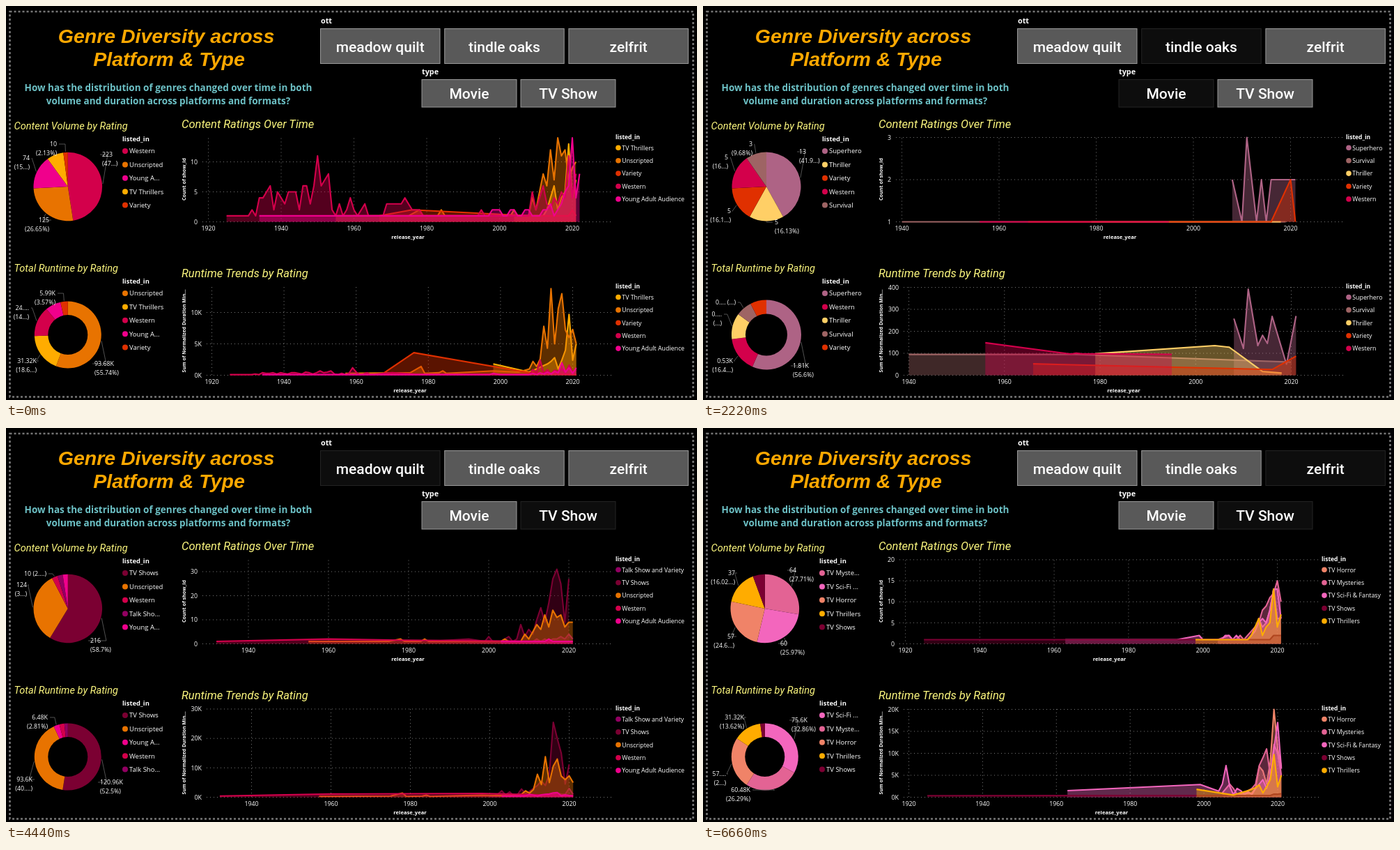
These frames come from a looping animation (992 px wide and 565 px high, 7770 ms). An HTML page:

```html
<!DOCTYPE html>
<html lang="en">
<head>
<meta charset="utf-8">
<title>Genre dashboard</title>
<style>
html, body { margin: 0; width: 100%; height: 100%; overflow: hidden; background: #000; }
svg { display: block; width: 992px; height: 565px; }
text { fill: #fff; font: 8.8px "Open Sans", "Noto Sans", sans-serif; }
.e { text-anchor: end; }
.m { text-anchor: middle; }
.b { font-weight: 700; }
.head { font: italic 700 28.5px "Liberation Sans", Arial, sans-serif; fill: #ffa800; }
.sub { font-size: 13.5px; font-weight: 700; fill: #6cc0c5; }
.cap { font: italic 14.6px Roboto, sans-serif; fill: #fbf67e; }
.big { font-size: 16.5px; }
.btn { font: 500 21px Roboto, sans-serif; }
.key { font-size: 9.5px; }
.grid { stroke: #777; stroke-dasharray: 1 4; }
.lead { stroke: #666; stroke-width: .8; fill: none; }
</style>
</head>
<body>
<svg id="stage" viewBox="0 0 992 565"></svg>
<script>
// key: colour, full name, short name
const GENRES = {
  W: ['#d3004b', 'Western'],
  U: ['#e87300', 'Unscripted'],
  Y: ['#f0008c', 'Young Adult Audience', 'Young A...'],
  H: ['#ffac00', 'TV Thrillers'],
  V: ['#e03000', 'Variety'],
  S: ['#c265a4', 'Suspense'],
  K: ['#920062', 'Talk Show and Variety', 'Talk Sho...'],
  P: ['#ae6385', 'Superhero'],
  T: ['#ffcf66', 'Thriller'],
  B: ['#9e6464', 'Survival'],
  R: ['#7f5500', 'Romantic Movies', 'Romantic...'],
  L: ['#7a0049', 'Thrillers'],
  N: ['#6e0028', 'Stand-Up Comedy', 'Stand-Up...'],
  F: ['#763c00', 'Sci-Fi &amp; Fantasy', 'Sci-Fi &amp; F...'],
  M: ['#741a00', 'Sports Movies', 'Sports M...'],
  X: ['#7b0032', 'TV Shows'],
  A: ['#5c0006', 'Talk Show'],
  G: ['#f4a967', 'Travel'],
  Q: ['#e36394', 'TV Mysteries', 'TV Myste...'],
  J: ['#f366bd', 'TV Sci-Fi &amp; Fantasy', 'TV Sci-Fi ...'],
  O: ['#f08368', 'TV Horror']
};

// Series: "@year" jumps, a value moves one year on, "v*n" repeats.
const unscripted = '@1955 1 @1975 1 @1978 2 1 @1983 1 2 1 @2003 1 2 1 @2008 1 4 2 5 8 6 12 7 14 11 12 7 9 ';
const unscriptedMin = '@1957 .3 @1975 .4 @1978 1.4 .3 @1983 .4 .7 .3 @1998 .7 @2005 .5 @2008 1 2.2 1.4 2.6 7.8 4.3 13.8 5 10.6 13 7.2 6 7.3 5';
const tvThrill = '@1998 1 @2012 1 2 4 6 2 4 5 13 4 7';
const tvThrillMin = '@1998 1.8 @2008 .5 @2013 1.8 2.2 2.8 1 2.4 4 9.7 2.4 5';
const suspense = {
  S: '@1922 3 @1934 4 @1950 5 @1954 3 @1966 4 @1972 3 @1982 4 6 3 4 7 9 8 8 9 13 9 14 12 17 12 11 12 13 12 22 10 16 23 21 24 26 27 17 22 21 32 45 65 53 73 85 140 238',
  K: '@1960 1 @2021 1',
  U: '@2021 1',
  W: '@1925 2 @1932 3 2 5 5 6 7 3 6 5 4 6 6 6 3 7 7 4 7 11 7 8 9 3 @1970 3 @1990 2 @2021 3',
  Y: '@1955 1 @1975 2 @2008 3 4 3 4 3 4 4 6 5 5 6 12 5 4'
};
const drama = {
  R: '@1956 1 @1961 2 @1965 4 @1971 2 @1984 3 @1992 2 @1995 2 2 5 5 4 7 5 6 9 8 15 14 12 16 10 27 20 13 10 23 32 27 48 38 45 37 13',
  F: '@1956 1 @1970 2 @1995 2 @2000 4 3 5 3 4 6 5 4 8 43 12 8 10 7 14 22 25 28 38 15 0',
  M: '@1980 1 @2000 2 3 4 3 4 5 5 6 5 8 7 6 8 10 14 20 28 30 24 22 20 12',
  N: '@1968 1 @2000 2 2 3 2 3 4 4 3 5 4 6 5 7 10 13 20 24 27 33 28 22 10',
  L: '@1984 1 1 1 @1990 1 4 2 1 3 2 2 6 5 3 4 6 11 5 7 6 5 7 9 11 14 9 7 14 28 45 73 73 75 45 33 16'
};

const SCENES = [
  { sel: [-1, -1], pie: { W: 223, U: 125, Y: 74, H: 37, V: 10 },
    pieTags: [[0, 138, 216, '223|(47...)'], [1, 62, 310, '125|(26.65%)'], [2, 34, 221, '74|(15...)'], [4, 73, 201, '10|(2.13%)']],
    ring: { U: 93.68, H: 31.32, W: 24.5, Y: 12.57, V: 5.99 },
    ringTags: [[0, 127, 516, '93.68K|(55.74%)'], [1, 44, 512, '31.32K|(18.6...)'], [2, 33, 436, '24....|(14...)'], [4, 71, 415, '5.99K|(3.57%)']],
    top: { l: 282, r: 872, x: [1920, 290.5, 5.225], y: '0 5 10', h: 43, data: {
      H: tvThrill.replace('@1998 1', '@2004 1'), U: unscripted + 10, V: '@1967 1 @1976 2 @2008 1 @2018 1 1 2 1',
      W: '@1925 1*7 2 1 4 4 5 6 2 5 4 3 5 5 5 2 6 6 3 6 11 6 7 8 2 1 3 1 2 4 2 1 2 3 1 @1968 1 3*5 4 3 2*3 1 @1994 1 2 1 @2007 1 1 5 2 4 6 3 2 4 3 5 4 11 4 8',
      Y: '@1934 1 @1997 1 2*3 1 1 2 2 1 1 2 2 1 1 1 2 2 3 1 2 3 5 6 14 4 8' } },
    low: { l: 288, r: 872, x: [1920, 295.5, 5.18], y: '0K 5K 10K', h: 45, data: {
      H: tvThrillMin, U: unscriptedMin, V: '@1967 .1 @1976 3.6 @2008 .4 @2021 .1',
      W: '@1925 .1 @1931 .1 .2 .1 .4 .3 .3 .4 .2 .4 .3 .2 .4 .4 .3 .2 .5 .4 .2 .4 .7 .4 .5 .7 .2 .1 .3 .1 .3 1.2 .5 .1 .2 .4 .1 @1970 .4 @1976 .2 @2008 .1 .9 .4 2.4 .3 .9 .2 .8 .6 1 .4 1.6 .5 .9',
      Y: '@1934 .1 @1997 .1 .3 .2 .1 @2008 .1 .3 .1 .4 .2 .5 .2 .6 .4 2 .5 1.2 .3 1.2' } } },

  { sel: [0, 0], pie: { S: 1240, W: 207, Y: 58, K: 5, U: 4 },
    pieTags: [[0, 131, 303, '1.24K|(81.9%)'], [1, 50, 208, '0.21K|(13.66%)']],
    ring: { S: 84.25, W: 11.43, Y: 3.9, U: .3, K: .12 },
    ringTags: [[0, 127, 516, '121.08K|(84.25%)'], [1, 53, 420, '16.43K|(11.43%)']],
    top: { l: 288, r: 872, x: [1920, 295.5, 5.18], y: '0 100 200', h: 48.5, data: suspense },
    low: { l: 288, r: 872, x: [1920, 295.5, 5.18], y: '0K 10K 20K', h: 50.5, k: .092, data: suspense } },

  { sel: [1, 0], c: [91, 49.5, 50, 30], lx: 171, rx: 923, pie: { P: 13, T: 5, V: 5, W: 5, B: 3 },
    pieTags: [[0, 138, 212, '13|(41.9...)'], [1, 103, 313, '5|(16.13%)'], [2, 40, 297, '5|(16.1...)'], [3, 36, 220, '5|(16...)'], [4, 71, 201, '3|(9.68%)']],
    ring: { P: 56.6, W: 16.4, T: 12, B: 7.5, V: 7.5 },
    ringTags: [[0, 129, 519, '1.81K|(56.6%)'], [1, 43, 512, '0.53K|(16.4...)'], [2, 27, 445, '0....|(...)'], [3, 47, 428, '0.... (...)']],
    top: { l: 277, r: 920, x: [1940, 285.5, 6.975], y: '1 2 3', h: 60.5, data: {
      P: '@2008 2 @2010 1 3 @2013 1 2 1 2 @2021 2', B: '@1940 1 @2019 1', T: '@1979 1 @2018 1',
      V: '@1966 1 @2016 1 @2020 2 1', W: '@1956 1 @1995 1' } },
    low: { l: 288, r: 920, x: [1940, 295.5, 6.8625], y: '0 100 200 300 400', h: 31.5, data: {
      P: '@2008 258 @2010 122 392 @2013 135 182 145 268 @2019 50 @2021 270', B: '@1940 95 @1974 95 @2020 60',
      T: '@1979 98 @2004 135 @2007 128 @2014 17 @2018 10', V: '@1966 52 @2016 26 @2021 87',
      W: '@1956 148 @1973 99 97 101 98 @1995 95' } } },

  { sel: [2, 0], rx: 891, pie: { R: 408, L: 389, N: 266, F: 183, M: 167 },
    pieTags: [[0, 125, 206, '408|(28.87%)'], [1, 103, 312, '389|(27.53%)'], [2, 41, 299, '266|(18.8...)'], [3, 32, 224, '183|(1...)'], [4, 66, 209, '167 (11....)']],
    ring: { L: 31.24, R: 30, F: 17.7, M: 10.8, N: 10.2 },
    ringTags: [[0, 127, 421, '55.59K|(31.24%)'], [1, 63, 527, '53.3... (30%)'], [2, 32, 499, '31....|(1...)'], [3, 38, 432, '19.2...|(10....)']],
    top: { l: 282, r: 888, x: [1960, 364.5, 7.383], y: '0 20 40 60 80', h: 30.15, data: drama },
    low: { l: 282, r: 888, x: [1960, 364.5, 7.383], y: '0K 2K 4K 6K 8K', h: 31.5, k: .107, data: drama } },

  { sel: [0, 1], pie: { X: 58.7, U: 33.7, W: 2.7, K: 2.5, Y: 2.4 },
    pieTags: [[0, 121, 308, '216|(58.7%)'], [1, 30, 228, '124|(3...)'], [2, 58, 212, '10 (2....)']],
    ring: { X: 52.5, U: 40.6, Y: 2.81, W: 2.4, K: 1.7 },
    ringTags: [[0, 135, 511, '120.96K|(52.5%)'], [1, 38, 507, '93.6K|(40....)'], [2, 60, 418, '6.48K|(2.81%)']],
    top: { l: 282, r: 872, x: [1940, 348, 5.75], y: '0 10 20 30', h: 34.5, data: {
      K: '@1995 1 @2010 1 1 2 1 2 1 2 2 3 2 4 2', X: '@1985 1 @1995 2 @1999 1 3 1 1 1 2 3 1 2 8 3 6 4 10 15 9 17 27 31 25 9 27',
      U: unscripted + 9, W: '@1932 1 @1960 2 @1978 1.5 @2000 1.2 @2021 1', Y: '@2003 1 @2014 1 2 1 @2021 1' } },
    low: { l: 288, r: 872, x: [1940, 352.5, 5.7], y: '0K 10K 20K 30K', h: 42.17, data: {
      K: '@2000 .3 @2010 .4 @2016 1 1.5 1 1 3 1', X: '@1990 .4 @2001 .6 1 2.2 .8 1.8 .6 1 2.8 1.2 2 3 4 5.5 4 8 25.5 20 15 4.5 11.2',
      U: unscriptedMin, W: '@1932 .4 @1960 1.1 @1998 1.3 @2021 .5', Y: '@2003 .4 @2009 .5 1 .7 .4 .8 1 1.1 1.5 1.6 .5 .8 .6 .5' } } },

  { sel: [1, 1], c: [92, 50, 51, 30], lx: 174, rx: 925, pie: { V: 5, B: 3, W: 2, A: 1, G: 1 },
    pieTags: [[0, 139, 212, '5|(41.67%)'], [1, 66, 317, '3 (25%)'], [2, 26, 271, '2|(...)'], [3, 46, 212, '1|(8.33%)']],
    ring: { V: 48.4, B: 24.24, W: 21.2, A: 3.1, G: 3.03 },
    ringTags: [[0, 144, 427, '5.76K|(48.4...)'], [1, 64, 524, '2.88K|(24.24%)'], [2, 42, 426, '2.52K|(21.2...)'], [4, 75, 411, '0.36K|(3.03%)']],
    top: { l: 277, r: 923, x: [1960, 364.5, 7.875], y: '1 2 3', h: 60.5, data: {
      B: '@2010 1 @2015 1', A: '@2021 1', G: '@2015 1', V: '@1955 1 @1976 2 @2008 1 @2018 1', W: '@2011 3 @2021 1' } },
    low: { l: 283, r: 923, x: [1960, 369.5, 7.81], y: '0K 1K 2K 3K 4K', h: 31.5, data: {
      B: '@2010 .36 @2014 1.8 .7', A: '@2021 .36', G: '@2015 .36',
      V: '@1955 .36 @1976 3.6 @2008 .37 @2017 1.1 .37', W: '@2011 2.18 @2021 .36' } } },

  { sel: [2, 1], rx: 888, pie: { Q: 64, J: 60, O: 57, H: 37, X: 13 },
    pieTags: [[0, 124, 207, '64|(27.71%)'], [1, 111, 312, '60|(25.97%)'], [2, 45, 302, '57|(24.6...)'], [3, 46, 211, '37|(16.02...)']],
    ring: { J: 32.86, Q: 26.29, O: 25, H: 13.62, X: 2.2 },
    ringTags: [[0, 127, 422, '75.6K|(32.86%)'], [1, 68, 522, '60.48K|(26.29%)'], [2, 33, 499, '57....|(2...)'], [3, 59, 418, '31.32K|(13.62%)']],
    top: { l: 282, r: 885, x: [1920, 290.5, 5.34], y: '0 5 10 15 20', h: 30.15, data: {
      O: '@2004 1 @2012 1 2 3 6 4 5 8 13 6 6', Q: '@2004 1 @2007 2 1 1 2 1 2 3 4 5 8 9 11 12 15 10',
      J: '@1963 1 @1993 1 @1999 2 1 @2004 1 1 2 2 1 2 1 1 1 2 3 5 6 5 8 13 13 6', X: '@1925 1 @2017 1 1 2 2 2', H: tvThrill } },
    low: { l: 288, r: 885, x: [1920, 295.5, 5.295], y: '0K 5K 10K 15K 20K', h: 31.5, data: {
      O: '@2008 .5 @2013 1 2 7 6 3 8 20 11 7', Q: '@2005 1 @2007 3 2 .6 1 1 1.5 2 3 7.2 9 11 5 12 10 5',
      J: '@1963 1.5 @1999 2.9 @2004 1.4 3 7.2 2.5 .6 2 1.5 .6 1.2 .6 2 3 4 2 5 11 17 6.5',
      X: '@1925 .35 @2017 .4 .4 .7 .7 .8', H: tvThrillMin } } }
];

const text = (x, y, s, cls = '', more = '') => `<text x="${x}" y="${y}" class="${cls}" ${more}>${s}</text>`;
const line = (x1, y1, x2, y2) => `<path class="grid" d="M${x1} ${y1}L${x2} ${y2}"/>`;
const dot = (x, y, r, c) => `<circle cx="${x}" cy="${y}" r="${r}" fill="${c}"/>`;

function points(str) {
  let year = 0;
  const out = [];
  for (const tok of str.split(' ')) {
    if (tok[0] === '@') { year = +tok.slice(1); continue; }
    const [v, n = 1] = tok.split('*').map(Number);
    for (let i = 0; i < n; i++) out.push([year++, v]);
  }
  return out;
}

function legend(x, y, keys, side) {
  const [gap, r, cls] = side ? [18.4, 3.8, ''] : [19.4, 4, 'key'];
  return text(x, y, 'listed_in', 'b', `style="font-size:${side ? 8.5 : 9.4}px"`) +
    keys.map((k, i) => {
      const [c, name, short] = GENRES[k], cy = y + (side ? 12.8 : 14) + gap * i;
      return dot(x + 4, cy, r, c) + text(x + (side ? 9.3 : 10), cy + 3.3, side ? name : short || name, cls);
    }).join('');
}

function pie(cx, cy, r, hole, parts, tags) {
  const sum = Object.values(parts).reduce((a, b) => a + b);
  const at = (f, d) => [cx + d * Math.sin(f * 2 * Math.PI), cy - d * Math.cos(f * 2 * Math.PI)];
  const mids = [];
  let f = 0, s = '';
  for (const k in parts) {
    const w = parts[k] / sum;
    s += `<path fill="${GENRES[k][0]}" d="M${cx} ${cy}L${at(f, r)}A${r} ${r} 0 ${+(w > .5)} 1 ${at(f + w, r)}Z"/>`;
    mids.push(f + w / 2);
    f += w;
  }
  if (hole) s += dot(cx, cy, hole, '#000');
  for (const [i, x, y, label] of tags) {
    const left = x < cx;
    s += `<path class="lead" d="M${at(mids[i], r + 1)}L${at(mids[i], r + 8)[0]} ${y - 3}H${x + (left ? 3 : -3)}"/>`;
    label.split('|').forEach((row, n) => s += text(x, y + 12.5 * n, row, left ? 'e' : ''));
  }
  return s;
}

function chart({ l, r, x: [year0, x0, step], y, h, k = 1, data }, base, title, size) {
  const labels = y.split(' '), [v0, v1] = labels.map(parseFloat), top = base - 121;
  const px = v => x0 + (v - year0) * step;
  const py = v => base - (v * k - v0) * h / (v1 - v0);
  const roof = base > 400 ? 403 : top + 1;
  let s = '';
  labels.forEach((t, i) => s += line(l, base - h * i, r, base - h * i) + text(l - 7, base - h * i + 3.2, t, 'e'));
  for (let n = year0; n <= 2020; n += 20) s += line(px(n), roof, px(n), base) + text(px(n), base + 12, n, 'm');
  for (const key in data) {
    const c = GENRES[key][0], p = points(data[key]).map(([n, v]) => [px(n), py(v)]);
    if (p.length < 2) { s += dot(...p[0], 3.3, c); continue; }
    const d = 'M' + p.join('L');
    s += `<path fill="${c}" fill-opacity=".4" d="${d}V${base}H${p[0][0]}Z"/>` +
      `<path fill="none" stroke="${c}" stroke-width="2.1" stroke-linejoin="round" d="${d}"/>`;
  }
  const mid = base > 400 ? 466 : 248.5;
  return s + text((l + r) / 2, base + 24.3, 'release_year', 'b m', 'style="font-size:7.6px"') +
    text(0, 0, title, 'b m', `style="font-size:${size}px" transform="translate(258 ${mid}) rotate(-90)"`);
}

function button(x, y, w, h, label, on) {
  const [fill, edge] = on ? ['#0d0d0d', '#242424'] : ['#595959', '#9a9a9a'];
  return `<rect x="${x}" y="${y}" width="${w}" height="${h}" fill="${fill}" stroke="${edge}"/>` +
    text(x + w / 2, y + h / 2 + 8, label, 'btn m');
}

function scene({ sel, c = [88.8, 49.3, 48, 28.5], lx = 167, rx = 875, pie: p, pieTags, ring, ringTags, top, low }) {
  return '<g visibility="hidden">' +
    ['meadow quilt', 'tindle oaks', 'zelfrit'].map((n, i) => button(451.5 + 178.2 * i, 32.5, 171.5, 50, n, i === sel[0])).join('') +
    ['Movie', 'TV Show'].map((n, i) => button(597 + 142 * i, 105.5, 136, 39.5, n, i === sel[1])).join('') +
    pie(c[0], 259, c[1], 0, p, pieTags) + pie(c[0], 471.5, c[2], c[3], ring, ringTags) +
    legend(lx, 194, Object.keys(p)) + legend(lx, 398, Object.keys(ring)) +
    chart(top, 309.5, 'Count of show_id', 7.2) +
    chart(low, 529.5, 'Sum of Normalized Duration Min...', 6.9) +
    legend(rx, 190.5, Object.keys(top.data), true) + legend(rx, 404.7, Object.keys(low.data), true) + '</g>';
}

const stage = document.getElementById('stage');
stage.innerHTML =
  '<rect x="5.5" y="8" width="981" height="552.5" fill="none" stroke="#777" stroke-width="2.6" stroke-dasharray="3 3"/>' +
  text(230, 53, 'Genre Diversity across', 'head m') +
  text(234, 86, 'Platform &amp; Type', 'head m') +
  text(233, 122, 'How has the distribution of genres changed over time in both', 'sub m') +
  text(233, 141, 'volume and duration across platforms and formats?', 'sub m') +
  text(452, 25, 'ott', 'b', 'style="font-size:10.8px"') +
  text(597, 98, 'type', 'b', 'style="font-size:10.8px"') +
  text(11.5, 177, 'Content Volume by Rating', 'cap') +
  text(11.5, 381, 'Total Runtime by Rating', 'cap') +
  text(252, 174.5, 'Content Ratings Over Time', 'cap big') +
  text(252, 388.5, 'Runtime Trends by Rating', 'cap big') +
  SCENES.map(scene).join('');

const views = stage.querySelectorAll('g');
const HOLD = 1110;
let shown = -1;
const start = performance.now();
function tick() {
  const i = Math.floor(Math.max(0, performance.now() - start) / HOLD) % views.length;
  if (i !== shown) {
    views.forEach((g, n) => g.setAttribute('visibility', n === i ? 'visible' : 'hidden'));
    shown = i;
  }
  requestAnimationFrame(tick);
}
tick();
</script>
</body>
</html>
```
